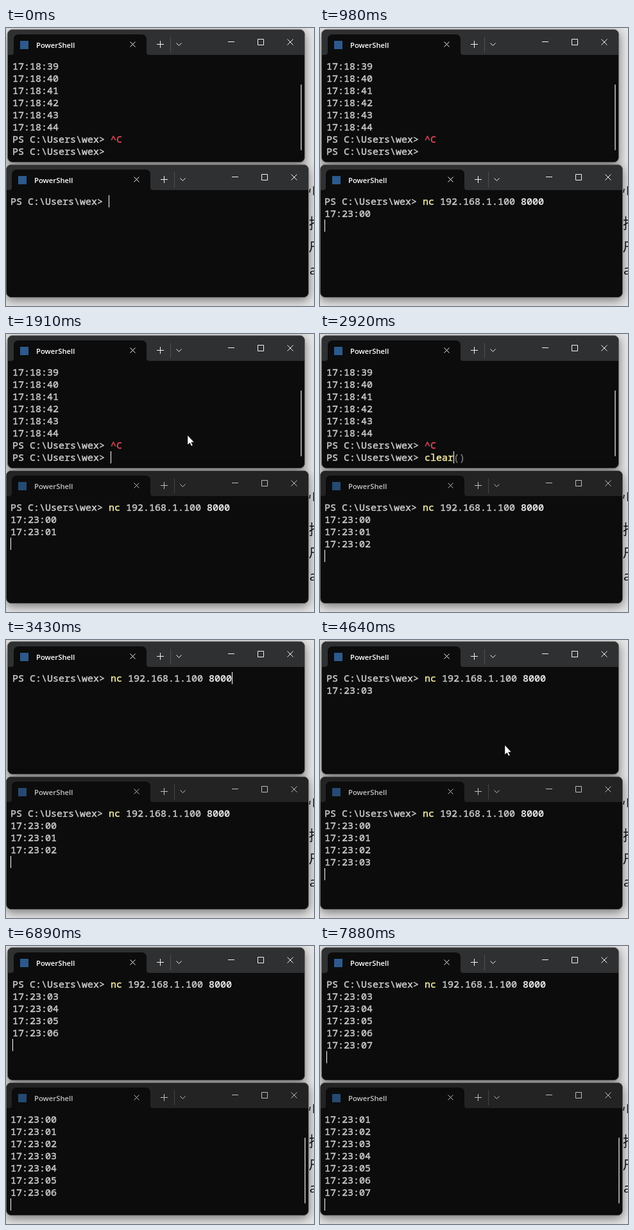
Write an HTML page that moves like this. It is 480 by 434 pixels and loops after 8000 ms.

```html
<!DOCTYPE html>
<html lang="en">
<head>
<meta charset="utf-8">
<title>Two terminals</title>
<style>
html, body { margin: 0; width: 100%; height: 100%; overflow: hidden; background: #e6e6e6 }
svg { display: block }
.win { filter: drop-shadow(0 4px 8px rgba(0, 0, 0, .5)) }
.bar { fill: #2f3031 }
.line { fill: none; stroke: #f4f4f4 }
.title { font: 600 11.3px "Open Sans", sans-serif; fill: #fff }
.blur .bar { fill: #232323 }
.blur .line, .blur .title { opacity: .75 }
.blur .icon { opacity: .8 }
.rows { font: 500 15px "Noto Sans Mono", monospace; fill: #ccc; stroke: #ccc; stroke-width: .45 }
.rows text { white-space: pre }
.cmd { fill: #f9f1a5; stroke: #f9f1a5 }
.num { fill: #f2f2f2; stroke: #f2f2f2 }
.err { fill: #e74856; stroke: #e74856 }
.ghost { fill: #767676; stroke: #767676 }
</style>
</head>
<body>
<svg id="stage" width="480" height="434" viewBox="0 0 480 434"></svg>
<script>
const stage = document.getElementById('stage');
const CELL = 9, ROW = 19;

// l shifts the left end of the tab, r everything right of the title
function windowMarkup(id, x, y, w, l, r) {
  return `<g id="${id}"><g class="win">
    <rect x="${x + .5}" y="${y + .5}" width="${w - 1}" height="207" rx="7.5" fill="#0c0c0c" stroke="#666"/></g>
    <path class="bar" d="M${x + 1} ${y + 40}v-32q0-7 7-7h${w - 16}q7 0 7 7v32z"/>
    <g transform="translate(0 ${y - 2})">
      <path fill="#0c0c0c" d="M${8 + l} 42q4 0 4-4v-20q0-8 8-8h${191 + r - l}q8 0 8 8v20q0 4 4 4z"/>
      <rect class="icon" x="${22 + l}" y="20" width="13" height="13" fill="#2c5a8c"/>
      <text class="title" x="${47 + l}" y="31">PowerShell</text>
      <g class="line" transform="translate(${r} 0)">
        <path d="M193.500 21.500l8 8m0-8l-8 8M235 25.500h11m-5.500-5.500v11M265.500 23.500l4 4 4-4M346 21.500h10M392.500 17.500h9v9h-9zM438.500 17.500l9 9m0-9l-9 9"/>
        <path stroke="#505050" d="M256.500 14v24"/>
      </g>
    </g>
    <g class="rows"></g>
    <rect class="scroll" x="${x + w - 7}" y="${y + 86}" width="2" height="103" rx="1" fill="#9a9a9a"/>
    <rect class="caret" width="1" height="${ROW}" fill="#fff"/>
  </g>`;
}

stage.innerHTML = `
  <g fill="none" stroke="#111" stroke-width="1.500">
    <path d="M474 251l-1 6M479.500 247v14M473 300h7M476.500 294v19q0 3-3 1M473 308l7-4M480 334h-4v8q0 5-3 8M476 341h4"/>
  </g>
  <text x="473" y="385" font-family="Noto Sans, sans-serif" font-weight="500" font-size="20" fill="#111">a</text>
  ${windowMarkup('upper', 2, 2, 464, 0, 0)}
  ${windowMarkup('lower', 0, 213, 472, -3, 6)}
  <path id="mouse" d="M0 0v15l3.500-3 2.300 5 2.200-1-2.300-5h4.500z" fill="#fff" stroke="#000" stroke-width=".5"/>`;

const span = (cls, text) => `<tspan class="${cls}">${text}</tspan>`;
const prompt = 'PS C:\\Users\\wex&gt; ';
const PROMPT_LEN = 17;
const clear = span('cmd', 'clear');
const connect = span('cmd', 'nc') + ' 192.168.1.100 ' + span('num', '8000');

const countUntil = (times, t) => times.filter(at => at <= t).length;
const stamps = (times, first, t) =>
  Array.from({ length: countUntil(times, t) }, (_, i) => '17:23:0' + (first + i));

const lowerTicks = [980, 1910, 2920, 3860, 4900, 5910, 6890, 7880];
const upperTicks = [3860, 4900, 5760, 6740, 7880];
const typing = [2280, 2400, 2520, 2770, 2920];
const caretOff = [[3050, 3170], [4390, 5060], [5480, 5760], [6060, 6620], [7170, 7730]];
const FOCUS = 1790;

function lowerState(t) {
  const cmd = t < 120 ? '' : t < 430 ? clear : connect;
  const times = stamps(lowerTicks, 0, t);
  const all = [prompt + cmd, ...times];
  const lines = all.slice(-7);
  const typed = t < 120 ? 0 : t < 430 ? 5 : 21;
  return {
    lines, scroll: all.length > 7, caret: true,
    row: times.length ? lines.length : 0,
    col: times.length ? 0 : PROMPT_LEN + typed
  };
}

function upperState(t) {
  const caret = t >= FOCUS && !caretOff.some(([a, b]) => t >= a && t < b);
  if (t < 3170) {
    const n = countUntil(typing, t);
    const ghost = n && t < 3050 ? span('ghost', 'clear()'.slice(n)) : '';
    const old = [39, 40, 41, 42, 43, 44].map(s => '17:18:' + s);
    return {
      lines: [...old, prompt + span('err', '^C'), prompt + span('cmd', 'clear'.slice(0, n)) + ghost],
      scroll: true, caret, row: 7, col: PROMPT_LEN + n
    };
  }
  const cmd = t < 3310 ? '' : t < 3430 ? clear : connect;
  const times = stamps(upperTicks, 3, t);
  const typed = t < 3310 ? 0 : t < 3430 ? 5 : 21;
  return {
    lines: [prompt + cmd, ...times], scroll: false, caret,
    row: times.length ? times.length + 1 : 0,
    col: times.length ? 0 : PROMPT_LEN + typed
  };
}

function show(id, x, y, state) {
  const win = document.getElementById(id);
  const rows = win.querySelector('.rows');
  const markup = state.lines.map((s, i) => `<text x="${x}" y="${y + 15 + i * ROW}">${s}</text>`).join('');
  if (rows.markup !== markup) rows.innerHTML = rows.markup = markup;
  const caret = win.querySelector('.caret');
  caret.setAttribute('x', x + state.col * CELL);
  caret.setAttribute('y', y + state.row * ROW);
  caret.style.display = state.caret ? '' : 'none';
  win.querySelector('.scroll').style.display = state.scroll ? '' : 'none';
}

// [time, x, y]; no position hides the pointer
const pointer = [
  [0], [1390, 266, 353], [1550, 272, 290], [1670, 278, 220], [1790, 282, 165],
  [1910, 283, 158], [2030, 283, 160], [2280], [4510, 286, 160], [4640, 288, 164],
  [4780, 284, 168], [4900, 281, 175], [5060, 281, 181], [5210, 331, 388], [5360]
];

function draw() {
  const t = performance.now() % 8000;
  show('upper', 10, 50, upperState(t));
  show('lower', 7, 261, lowerState(t));
  document.getElementById('lower').classList.toggle('blur', t >= FOCUS);
  const [, x, y] = pointer.findLast(p => p[0] <= t);
  const mouse = document.getElementById('mouse');
  mouse.style.display = x ? '' : 'none';
  if (x) mouse.setAttribute('transform', `translate(${x} ${y})`);
  requestAnimationFrame(draw);
}
draw();
</script>
</body>
</html>
```
